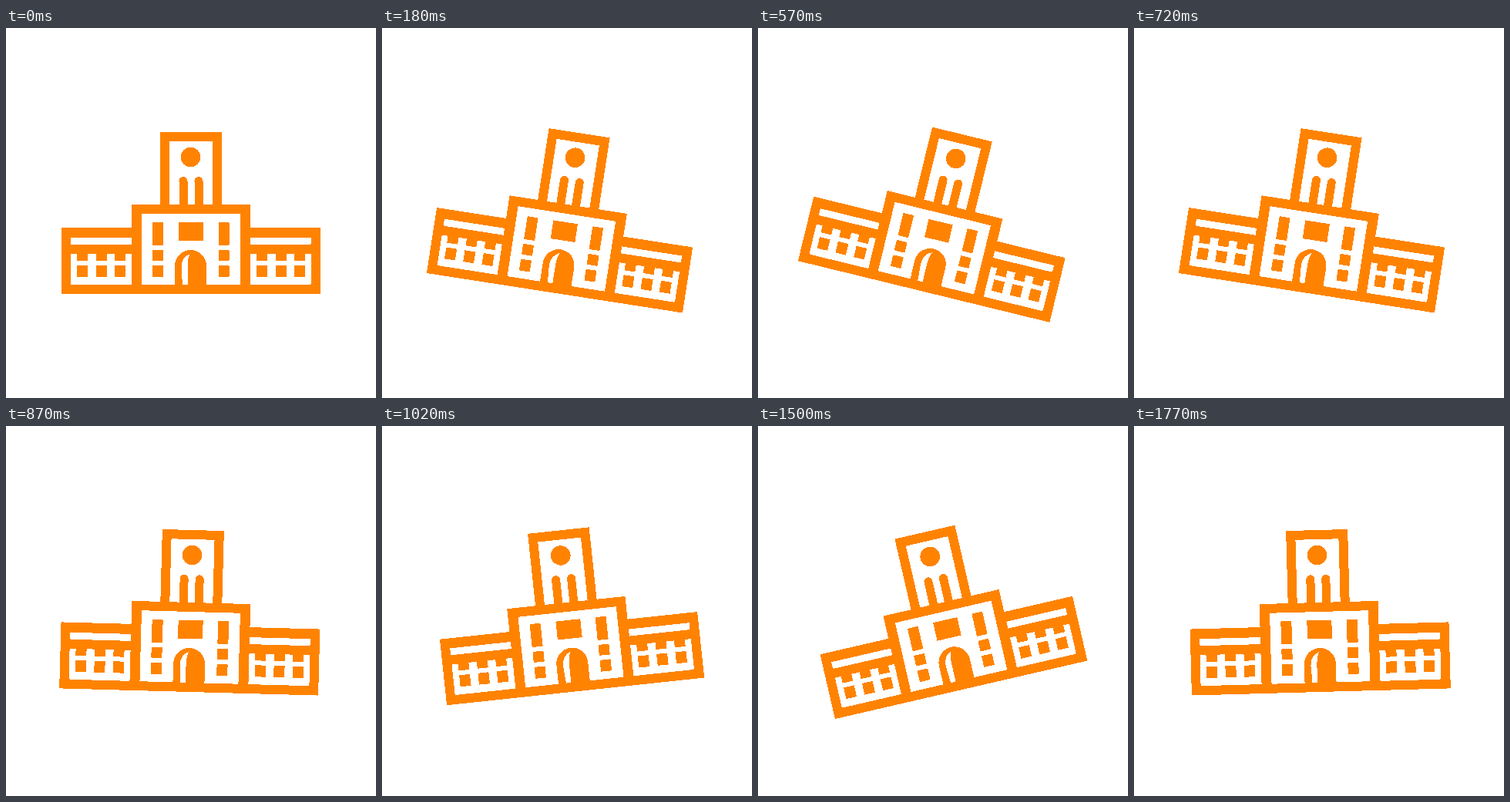
These frames come from a looping animation (480 px wide and 480 px high, 1800 ms). An HTML page:

```html
<!DOCTYPE html>
<html lang="en">
<head>
<meta charset="utf-8">
<title>Swaying building</title>
<style>
  @property --phase {
    syntax: "<angle>";
    inherits: false;
    initial-value: 0deg;
  }
  html, body {
    margin: 0;
    width: 100%;
    height: 100%;
    overflow: hidden;
    background: #fff;
  }
  svg {
    display: block;
    width: 100vw;
    height: 100vh;
    fill: #ff8300;
    shape-rendering: crispEdges;
  }
  .gap { fill: #fff; }
  /* Sine sway of 15 degrees, redrawn every 30 ms */
  .building {
    transform-origin: 240px 240px;
    transform: rotate(calc(15deg * sin(var(--phase))));
    animation: sway 1800ms steps(60) -1ms infinite;
  }
  @keyframes sway {
    from { --phase: 0deg; }
    to { --phase: 360deg; }
  }
</style>
</head>
<body>
<svg viewBox="0 0 480 480">
  <defs>
    <g id="wing">
      <path class="gap" d="M163 272V281H86Q84 281 84 279V272ZM163 293V333H86Q84 333 84 331V293Z"/>
      <path d="M92 292h14v10h-14zM116.500 292h14v10h-14zM141 292h14v10h-14z"/>
      <path d="M92 308h14v15h-14zM116.500 308h14v15h-14zM141 308h14v15h-14z"/>
    </g>
    <g id="windows">
      <rect x="190" y="252" width="14" height="30" rx="1"/>
      <rect x="190" y="288" width="14" height="14" rx="1"/>
      <rect x="190" y="308" width="14" height="15" rx="1"/>
    </g>
    <path id="column" d="M224.500 230V198.500a5.500 5.500 0 0 1 11 0V230Z"/>
  </defs>
  <g class="building">
    <rect x="72" y="259" width="336" height="86" rx="1"/>
    <rect x="163" y="229" width="154" height="116"/>
    <rect x="200" y="135" width="80" height="100"/>

    <rect class="gap" x="212" y="147" width="56" height="82"/>
    <circle cx="239.500" cy="167.500" r="12.800"/>
    <use href="#column"/>
    <use href="#column" x="20"/>

    <use href="#wing"/>
    <use href="#wing" transform="matrix(-1 0 0 1 480 0)"/>

    <rect class="gap" x="176" y="241" width="128" height="92"/>
    <use href="#windows"/>
    <use href="#windows" x="85.500"/>
    <rect x="224" y="252" width="32" height="24"/>

    <path d="M219 334V308.500a20.500 20.500 0 0 1 41 0V334Z"/>
    <path class="gap" d="M238.500 293C231 296 227.500 302 227.500 311L229 333H235.500V308C235.500 302 236.500 297 238.500 293Z"/>
  </g>
</svg>
</body>
</html>
```
